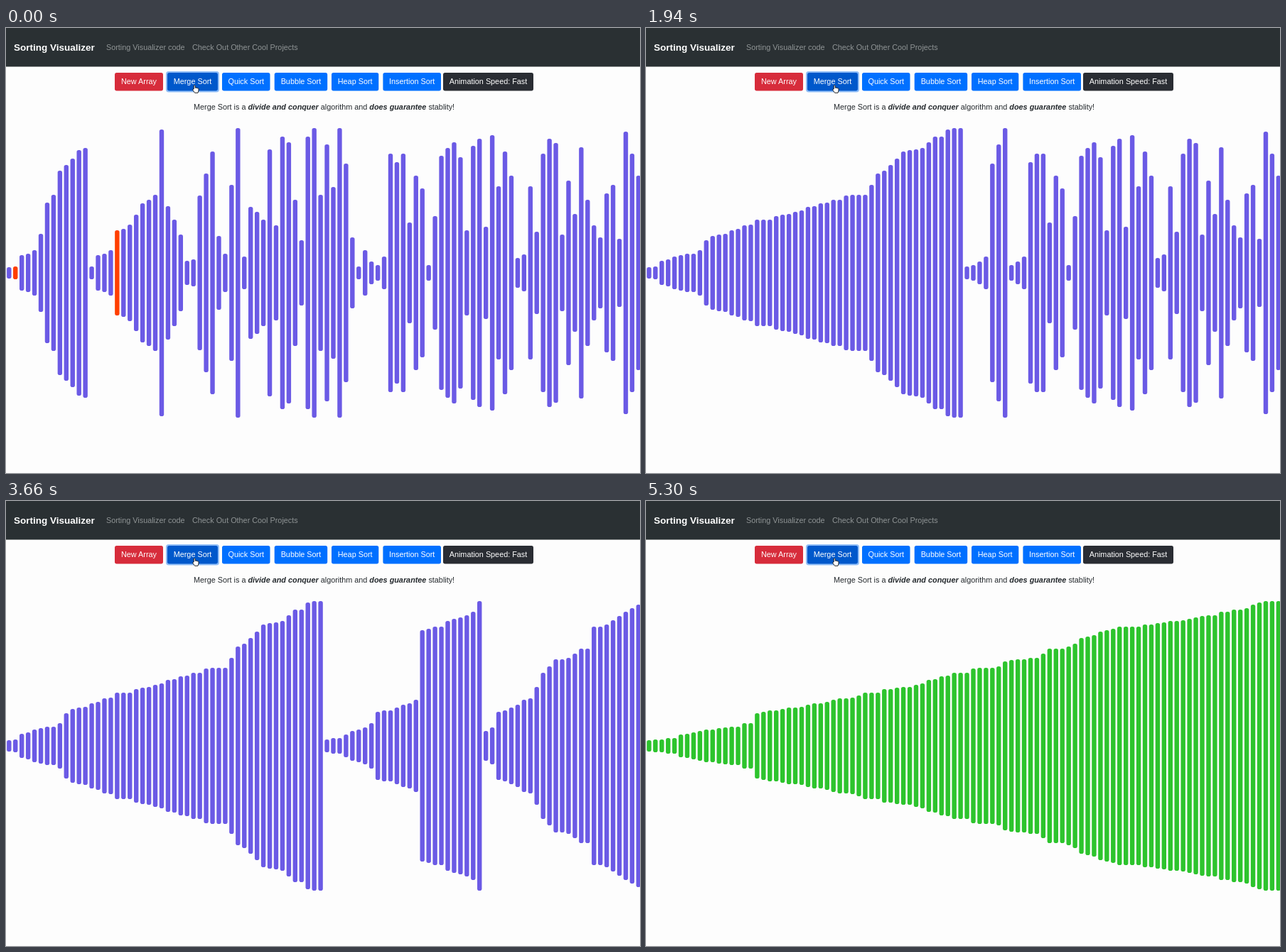
Recreate the animation shown at these times as an HTML page. Size 892 by 627 pixels, loop 5400 ms.

```html
<!DOCTYPE html>
<html lang="en">
<head>
<meta charset="utf-8">
<title>Sorting Visualizer</title>
<style>
  html, body { margin: 0; width: 100%; height: 100%; overflow: hidden; background: #fdfdfd; }
  svg { display: block; font: 10.83px "Liberation Sans", Arial, sans-serif; }
  .brand { font-size: 13.5px; font-weight: bold; fill: #fff; }
  .link { fill: #8f9495; }
  .label { fill: #fff; text-anchor: middle; }
  .strong { font-weight: bold; font-style: italic; }
</style>
</head>
<body>
<svg id="stage" width="892" height="627" viewBox="0 0 892 627">
  <rect width="892" height="54.5" fill="#2a3033"/>
  <text class="brand" x="11" y="32.3">Sorting Visualizer</text>
  <text class="link" x="141" y="31">Sorting Visualizer code</text>
  <text class="link" x="262" y="31">Check Out Other Cool Projects</text>
  <g id="buttons"></g>
  <text x="264" y="115" fill="#24292d">Merge Sort is a <tspan class="strong">divide and conquer</tspan> algorithm and <tspan class="strong">does guarantee</tspan> stablity!</text>
  <g id="bars"></g>
  <path d="M264.2 86V81.3q1-1.4 2 0V84.3q1-.8 1.8.2 1-.5 1.6.4 1.2-.3 1.4.8V88l-1 3.4h-4.4l-2.8-4q0-1.5 1.4-1.4z" fill="#fff" stroke="#111" stroke-width=".9" stroke-linejoin="round"/>
</svg>
<script>
const LOOP = 5400, BEAT = 140;
const MIDDLE = 345, PITCH = 8.945, WIDTH = 6.4;
const PURPLE = '#6b5ae5', ORANGE = '#ff3f00', GREEN = '#2dc42d';
const WRITES_BEFORE = 99.3, WRITES_PER_TICK = 5.543;
const SWEEP_START = 103.3, SWEEP_RATE = 11.1;

// Top edge of every bar; a smaller top is a larger value.
const tops = [
  337, 290, 270, 265, 262, 257, 246, 235, 201, 193, 184, 172, 169,
  336, 320, 318, 313, 285, 283, 277, 263, 247, 242, 235, 143,
  251, 270, 291, 328, 326, 236, 205, 174, 293, 318, 221, 141, 322,
  252, 259, 270, 171, 278, 153, 161, 242, 299, 153, 141, 235,
  164, 224, 141, 191, 295, 336, 313, 329, 334, 322, 177, 189, 177,
  274, 208, 226, 334, 265, 180, 169, 161, 182, 285, 166, 156,
  280, 151, 223, 174, 208, 324, 319, 223, 287, 177, 156, 162, 291,
  215, 262, 168, 242, 278, 295, 233, 221, 297, 146, 177, 208
];

function recordMergeSort(list) {
  const data = [...list], writes = [];
  const sort = (lo, hi) => {
    if (lo >= hi) return;
    const mid = (lo + hi) >> 1;
    sort(lo, mid);
    sort(mid + 1, hi);
    const old = [...data];
    let i = lo, j = mid + 1;
    for (let k = lo; k <= hi; k++) {
      const pair = [i > mid ? j : i, j > hi ? i : j];
      const takeLeft = j > hi || (i <= mid && old[i] >= old[j]);
      data[k] = old[takeLeft ? i++ : j++];
      writes.push({ at: k, top: data[k], pair });
    }
  };
  sort(0, list.length - 1);
  return writes;
}

function add(parent, tag, attrs, text = '') {
  const node = document.createElementNS('http://www.w3.org/2000/svg', tag);
  for (const name in attrs) node.setAttribute(name, attrs[name]);
  node.textContent = text;
  return parent.appendChild(node);
}

const buttons = document.getElementById('buttons');
function addButton(text, x, width, fill, focused) {
  if (focused) {
    add(buttons, 'rect', { x: x - 2, y: 61, width: width + 4, height: 29.5, rx: 4, fill: '#8fbdf7' });
  }
  add(buttons, 'rect', { x, y: 63, width, height: 25.5, rx: 2.7, fill });
  add(buttons, 'text', { class: 'label', x: x + width / 2, y: 79.3 }, text);
}
const BLUE = '#0070ff';
addButton('New Array', 153, 68, '#d72c3b');
addButton('Merge Sort', 227, 71, '#0058cb', true);
addButton('Quick Sort', 304, 67.5, BLUE);
addButton('Bubble Sort', 377.7, 74.5, BLUE);
addButton('Heap Sort', 458, 66.3, BLUE);
addButton('Insertion Sort', 530.4, 81.6, BLUE);
addButton('Animation Speed: Fast', 615, 127, '#2a2d33');

const barGroup = document.getElementById('bars');
const bars = tops.map((_, i) =>
  add(barGroup, 'rect', { x: 1.1 + i * PITCH, width: WIDTH, rx: 2.8 }));
const writes = recordMergeSort(tops);

// Each beat holds three ticks lasting 20, 100 and 20 ms.
function tickAt(time) {
  const rest = time % BEAT;
  return Math.floor(time / BEAT) * 3 + (rest >= 20) + (rest >= 120);
}

function draw(now) {
  const tick = tickAt(now % LOOP);
  const done = Math.min(writes.length, Math.floor(WRITES_BEFORE + WRITES_PER_TICK * tick));
  const sorted = Math.floor((tick - SWEEP_START) * SWEEP_RATE);
  const current = [...tops];
  for (const { at, top } of writes.slice(0, done)) current[at] = top;

  const comparing = done < writes.length && tick * 23 % 59 < 20;
  const marked = comparing ? writes[done - 1].pair : [];
  bars.forEach((bar, i) => {
    bar.setAttribute('y', current[i]);
    bar.setAttribute('height', 2 * (MIDDLE - current[i]));
    bar.setAttribute('fill', i < sorted ? GREEN : marked.includes(i) ? ORANGE : PURPLE);
  });
  requestAnimationFrame(draw);
}
draw(performance.now());
</script>
</body>
</html>
```
